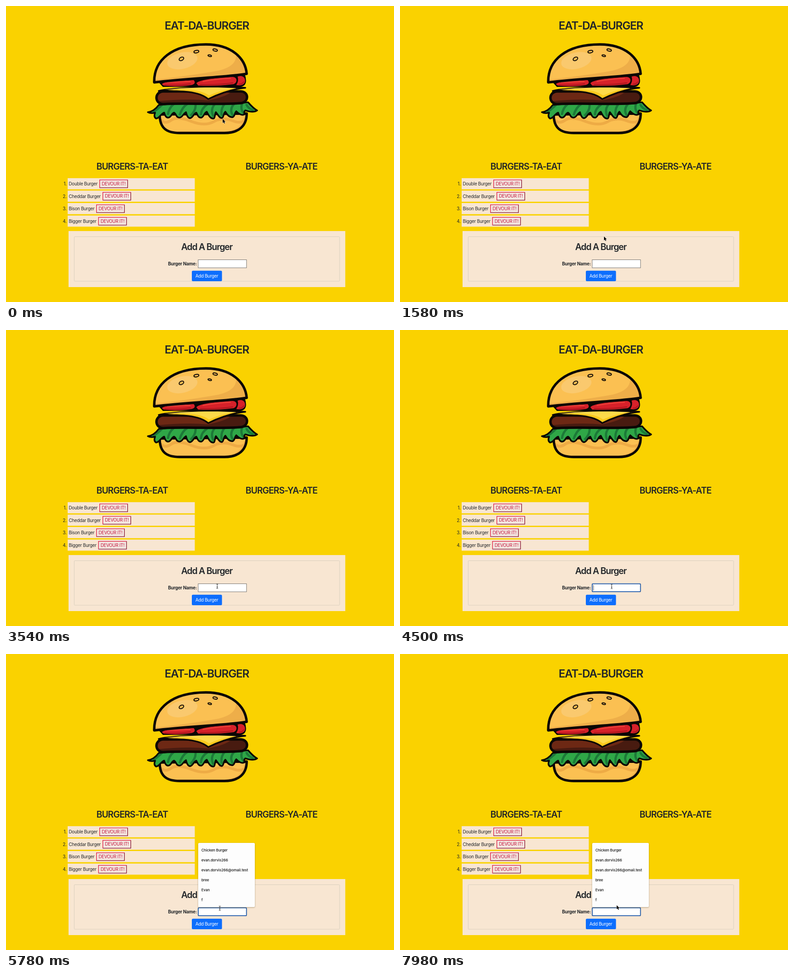
An HTML page for the animation above (8000 ms loop, 856 px wide and 655 px high).

```html
<!DOCTYPE html>
<html lang="en">
<head>
<meta charset="utf-8">
<title>Eat-Da-Burger</title>
<style>
html, body { margin: 0; width: 100%; height: 100%; overflow: hidden; background: #fad200; }
svg { display: block; width: 856px; height: 655px; }
text { font: 400 9.8px Inter, "Open Sans", sans-serif; letter-spacing: -.025em; fill: #212529; white-space: pre; }
.mid { text-anchor: middle; }
.end { text-anchor: end; }
.h1 { font-size: 24.4px; font-weight: 600; letter-spacing: -.044em; }
.h2 { font-size: 19.5px; font-weight: 600; letter-spacing: -.046em; }
.form-title { letter-spacing: -.055em; }
.label { font-weight: 700; letter-spacing: -.02em; }
.light { fill: #fff; }
.devour text { fill: #c4143c; }
.menu text { font-size: 8px; font-weight: 500; letter-spacing: -.01em; fill: #111; }
.menu rect { filter: drop-shadow(0 1px 1.5px rgba(70, 50, 0, .4)); }
.panel { fill: #f8e6d2; }

.ink { stroke: #0b0705; stroke-width: 5.4; stroke-linejoin: round; stroke-linecap: round; }
.thin { stroke-width: 3.6; }
.seed { stroke: #0b0705; stroke-width: 2; fill: #f5b850; }

/* One shared clock of eight seconds */
.pointer { animation: travel 8s infinite; }
.arrow { animation: arrow 8s step-end infinite; }
.beam { animation: beam 8s step-end infinite; }
.focus { animation: focus 8s step-end infinite; }
.caret { animation: blink 1s -.8s step-end infinite; }
.menu { animation: menu 8s step-end infinite; }

@keyframes travel {
  0%, .6% { transform: translate(478px, 250px); animation-timing-function: ease-out; }
  4%, 26.25% { transform: translate(450px, 510px); animation-timing-function: ease-in-out; }
  31%, 48% { transform: translate(466px, 567px); animation-timing-function: ease-in-out; }
  51%, 70% { transform: translate(467px, 567.5px); animation-timing-function: ease-in-out; }
  75%, 100% { transform: translate(478px, 556px); }
}
@keyframes arrow { 0% { opacity: 1; } 32.5% { opacity: 0; } 72.5%, 100% { opacity: 1; } }
@keyframes beam { 0% { opacity: 0; } 32.5% { opacity: 1; } 72.5%, 100% { opacity: 0; } }
@keyframes focus { 0% { opacity: 0; } 52.5%, 100% { opacity: 1; } }
@keyframes menu { 0% { opacity: 0; } 71.75%, 100% { opacity: 1; } }
@keyframes blink { 0% { opacity: 1; } 50%, 100% { opacity: 0; } }
</style>
</head>
<body>
<svg viewBox="0 0 856 655">
  <defs>
    <clipPath id="bunClip"><path id="bun" d="M327 169C326 120 366 85 441 85C497 85 528 115 531 150C480 158 400 160 327 169Z"/></clipPath>
    <clipPath id="baseClip"><path id="base" d="M339 240C339 270 354 281 383 281H482C513 281 531 266 531 238Z"/></clipPath>
    <clipPath id="pattyClip"><path id="patty" d="M346 189H518C537 190 536 214 517 215C470 219 400 214 348 217C328 218 326 191 346 189Z"/></clipPath>
    <clipPath id="leafClip"><path id="leaf" d="M337 219C331 227 322 234 313 235C320 239 326 236 329 236C327 241 326 246 331 249C339 248 342 238 349 236C351 243 353 247 358 247C365 246 365 237 371 236C376 239 375 247 383 247C390 246 391 238 397 235C399 243 402 249 407 248C413 246 414 238 420 236C423 242 424 247 431 247C437 245 437 236 443 234C447 242 451 250 458 249C462 247 460 239 463 235C468 241 471 248 476 248C481 246 479 238 484 234C488 241 493 247 500 246C505 244 504 237 508 233C513 238 520 243 526 240C526 236 524 234 528 231C537 234 547 236 554 231C546 227 540 220 534 213C492 218 400 211 337 219Z"/></clipPath>
    <g id="devour" class="devour">
      <rect width="63" height="18.600" fill="#f2e6e0"/>
      <path d="M0 18.600V0H63L61.700 1.300H1.300V17.300Z" fill="#dc143c"/>
      <path d="M63 0V18.600H0L1.300 17.300H61.700V1.300Z" fill="#83102c"/>
      <text class="mid" x="31.500" y="12.700">DEVOUR IT!</text>
    </g>
    <rect id="row" class="panel" width="280.500" height="24.600"/>
  </defs>

  <rect width="856" height="655" fill="#fad200"/>
  <text class="h1 mid" x="443" y="52">EAT-DA-BURGER</text>

  <g class="burger">
    <!-- bottom bun -->
    <use href="#base" fill="#fbc052"/>
    <g clip-path="url(#baseClip)" fill="none">
      <path d="M339 250Q350 263 364 253T408 255T458 256T500 254T535 246" stroke="#eeab45" stroke-width="6"/>
      <path d="M360 281H485Q523 278 529 247" stroke="#eeab45" stroke-width="7"/>
    </g>
    <use href="#base" class="ink" fill="none"/>

    <!-- lettuce -->
    <use href="#leaf" fill="#2fa747"/>
    <g clip-path="url(#leafClip)" fill="none" stroke="#1c7938" stroke-width="5">
      <path d="M345 218Q333 230 324 235M370 217Q359 226 357 241M401 216Q388 224 383 242M418 217Q420 230 407 243M444 218Q430 227 430 242M460 218Q450 230 458 245M482 217Q473 228 476 243M505 215Q491 228 501 243M521 216Q516 229 526 239M530 217Q533 226 546 231"/>
    </g>
    <use href="#leaf" class="ink thin" fill="none"/>

    <!-- patty -->
    <use href="#patty" fill="#6d2814"/>
    <g clip-path="url(#pattyClip)">
      <path d="M330 211Q400 204 445 209Q487 201 499 188H540V222H330Z" fill="#481b10"/>
    </g>
    <use href="#patty" class="ink" fill="none"/>

    <!-- tomatoes -->
    <path d="M338 170Q420 155 527 151Q535 176 518 179H346Z" fill="#0b0705"/>
    <path d="M511 156C524 152 529 160 527 169C523 176 515 176 508 175Q514 166 511 156Z" fill="#d7212a"/>
    <path d="M344 173C348 166 382 166 414 164C419 169 416 174 408 175Q374 180 348 176Z" fill="#d7212a"/>
    <path d="M420 171C426 162 474 158 500 157C512 158 510 170 502 173Q462 178 424 176Z" fill="#d7212a"/>
    <path d="M350 175Q380 177 408 172M428 174Q472 175 501 170M514 173Q522 173 525 167" fill="none" stroke="#b0161f" stroke-width="2.500"/>
    <path d="M355 169Q382 168 407 167M434 167Q468 161 496 160" fill="none" stroke="#ee4438" stroke-width="1.800"/>

    <!-- cheese -->
    <path class="ink thin" d="M337 188C370 180 470 178 528 181C507 183 479 190 446 206C425 188 388 188 337 188Z" fill="#fbc91d"/>
    <path d="M350 185C395 180 468 179 508 182C480 185 464 191 448 198C429 183 388 184 350 185Z" fill="#fcda4a"/>

    <!-- top bun -->
    <g clip-path="url(#bunClip)">
      <rect x="320" y="80" width="220" height="95" fill="#fbc052"/>
      <path d="M320 164Q410 154 469 143Q518 131 505 96L545 115V175H320Z" fill="#eeae49"/>
      <ellipse cx="389" cy="121" rx="34" ry="18" transform="rotate(-13 389 121)" fill="#fac96e"/>
    </g>
    <use href="#bun" class="ink" fill="none"/>
    <ellipse class="seed" cx="387" cy="117" rx="5.500" ry="3.500" transform="rotate(-28 387 117)"/>
    <ellipse class="seed" cx="420" cy="101" rx="5.500" ry="2.700" transform="rotate(-10 420 101)"/>
    <ellipse class="seed" cx="461.500" cy="97.500" rx="5" ry="2.400" transform="rotate(12 461.500 97.500)"/>
    <ellipse class="seed" cx="449.500" cy="110" rx="4" ry="1.800" transform="rotate(14 449.500 110)"/>
  </g>

  <text class="h2 mid" x="278.300" y="362">BURGERS-TA-EAT</text>
  <text class="h2 mid" x="607.700" y="362">BURGERS-YA-ATE</text>

  <g transform="translate(136 381)">
    <use href="#row"/>
    <text class="end" x="-2.500" y="16">1.</text>
    <text x="2.500" y="16">Double Burger</text>
    <use href="#devour" x="70" y="3.200"/>
  </g>
  <g transform="translate(136 408.500)">
    <use href="#row"/>
    <text class="end" x="-2.500" y="16">2.</text>
    <text x="2.500" y="16">Cheddar Burger</text>
    <use href="#devour" x="77" y="3.200"/>
  </g>
  <g transform="translate(136 436)">
    <use href="#row"/>
    <text class="end" x="-2.500" y="16">3.</text>
    <text x="2.500" y="16">Bison Burger</text>
    <use href="#devour" x="63" y="3.200"/>
  </g>
  <g transform="translate(136 463.700)">
    <use href="#row"/>
    <text class="end" x="-2.500" y="16">4.</text>
    <text x="2.500" y="16">Bigger Burger</text>
    <use href="#devour" x="67.500" y="3.200"/>
  </g>

  <rect class="panel" x="138" y="498" width="610.500" height="124"/>
  <rect x="150.500" y="510.500" width="585.500" height="98.500" rx="1.500" fill="none" stroke="#d6cdbb" stroke-width=".9"/>
  <text class="h2 form-title mid" x="443" y="540">Add A Burger</text>
  <text class="label end" x="421" y="574">Burger Name:</text>
  <rect x="424" y="561.500" width="106.700" height="17.800" fill="#fff" stroke="#77736e"/>
  <g class="focus">
    <rect x="424.200" y="561.700" width="106.300" height="17.400" rx="1.500" fill="#fff" stroke="#1a56a8" stroke-width="1.700"/>
    <path class="caret" d="M427 564.500V576.500" stroke="#222" stroke-width=".8"/>
  </g>
  <rect x="410" y="585.700" width="66.500" height="23.300" rx="2.500" fill="#0d6efd"/>
  <text class="light mid" x="443" y="601">Add Burger</text>

  <g class="menu">
    <rect x="424" y="418" width="125" height="142" rx="2.500" fill="#fdfdfd"/>
    <text x="431" y="437">Chicken Burger</text>
    <text x="431" y="459">evan.dorvis266</text>
    <text x="431" y="481">evan.dorvis266@omail.test</text>
    <text x="431" y="503">bree</text>
    <text x="431" y="525">Evan</text>
    <text x="431" y="547">f</text>
  </g>

  <g class="pointer">
    <path class="arrow" d="M0 0V8.700L2 6.900L3.400 10.100L5 9.400L3.600 6.300H6.300Z" fill="#000" stroke="#fff" stroke-width=".8" paint-order="stroke"/>
    <path class="beam" d="M-2 -5Q0 -5 0 -3.800Q0 -5 2 -5M0 -4V4M-2 5Q0 5 0 3.800Q0 5 2 5M-1.200 1.500H1.200" fill="none" stroke="#222" stroke-width=".9"/>
  </g>
</svg>
</body>
</html>
```
